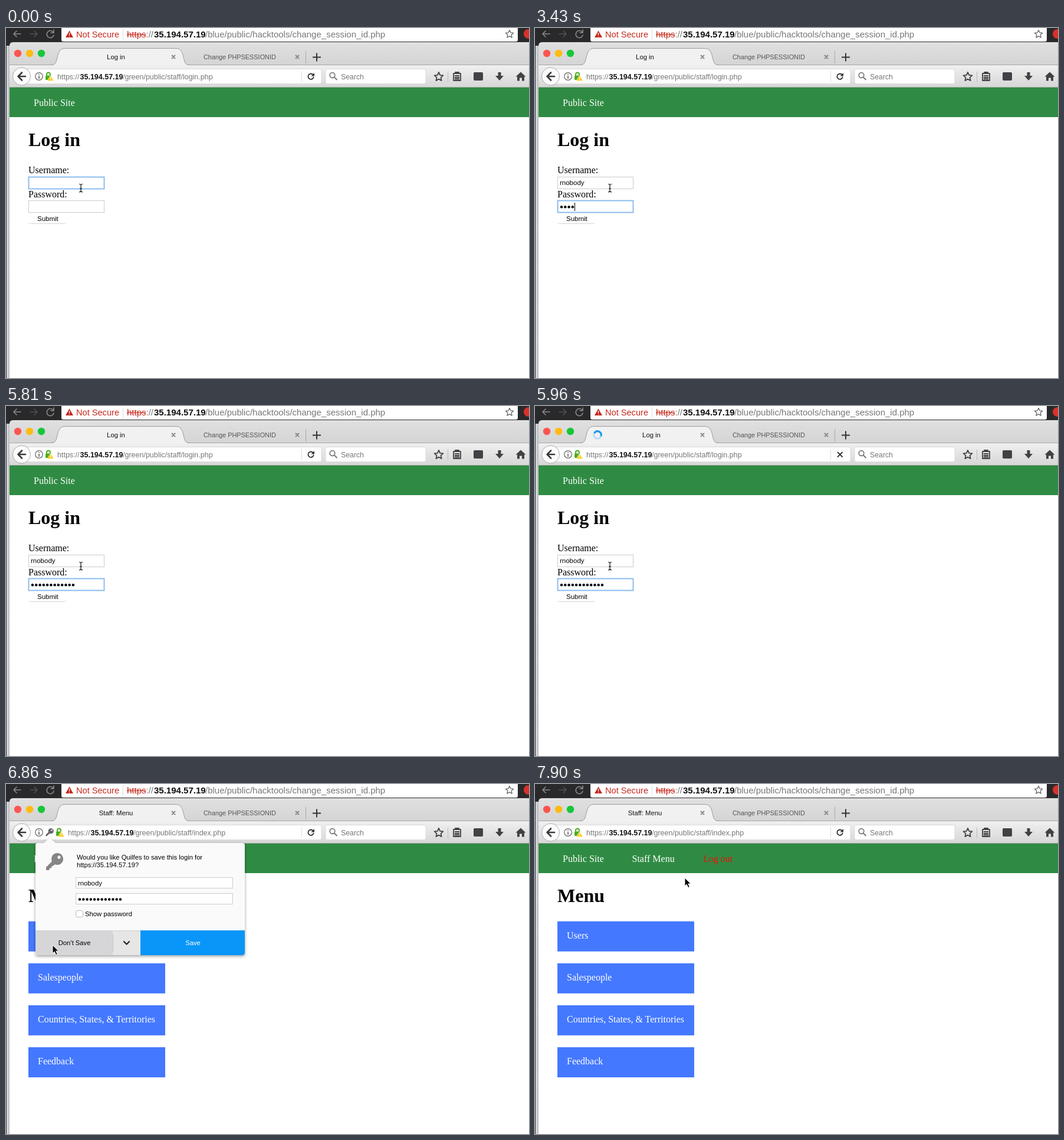
Write an HTML page that moves like this. It is 887x593 px and loops after 8000 ms.

```html
<!DOCTYPE html>
<html lang="en">
<head>
<meta charset="utf-8">
<title>Log in</title>
<style>
html, body { margin: 0; width: 100%; height: 100%; overflow: hidden; background: #fff; }
svg { display: block; width: 887px; height: 593px; }
text { font-family: "Liberation Sans", Arial, sans-serif; font-size: 11.3px; white-space: pre; }
.serif { font-family: "Liberation Serif", "Times New Roman", serif; font-size: 16px; }
.h1 { font-size: 32px; font-weight: bold; }
.b { font-weight: bold; fill: #111; }
.mid { text-anchor: middle; }
.white { fill: #fff; }
.line { fill: none; stroke-linecap: round; stroke-linejoin: round; }
.url { font-size: 12.5px; fill: #777; }
.omni { font-size: 15px; fill: #777; }
.field { fill: #fff; stroke: #ccc; }
.field.focus { stroke: #8dbcf0; stroke-width: 2; }
</style>
</head>
<body>
<svg viewBox="0 0 887 593">
  <defs>
    <linearGradient id="tabbar" x2="0" y2="1"><stop stop-color="#e0e0e0"/><stop offset="1" stop-color="#c9c9c9"/></linearGradient>
    <linearGradient id="toolbar" x2="0" y2="1"><stop stop-color="#f0f0f0"/><stop offset="1" stop-color="#d6d6d6"/></linearGradient>
    <linearGradient id="edge" x2="1" y2="0"><stop stop-color="#e2e2e2"/><stop offset="1" stop-color="#bcbcbc"/></linearGradient>
    <filter id="shade" x="-10%" y="-10%" width="120%" height="120%"><feDropShadow dx="0" dy="2" stdDeviation="2.6" flood-opacity=".38"/></filter>
    <g id="keyShape">
      <path d="M13 12 1 24v5h5l1-3 3-1 1-3 3-1 4-4z"/>
      <path fill-rule="evenodd" d="M20 0a10 10 0 1 0 .1 0zM23 4.500a2.700 2.700 0 1 1-.1 0z"/>
    </g>
  </defs>

  <!-- back window -->
  <rect width="887" height="593" fill="#fff"/>
  <rect width="887" height="30" fill="#29292b"/>
  <rect x="94" y="-4" width="774" height="27" rx="3" fill="#fff"/>
  <g class="line" stroke="#8b8b8b" stroke-width="1.6">
    <path d="M25 10H13m5-5-5 5 5 5"/>
    <path d="M41 10h12m-5-5 5 5-5 5" stroke="#505052"/>
    <path d="M80 7a6 6 0 1 0 1 5M81 3v5h-5"/>
  </g>
  <path d="M107.500 4.500 114 16h-13z" fill="#c5281c"/>
  <path d="M107.500 8v4m0 1.300v1.200" stroke="#fff" stroke-width="1.300"/>
  <text x="119" y="16" class="omni" style="font-size:14.6px;fill:#c5281c">Not Secure</text>
  <path d="M198.500 2v17" stroke="#ddd"/>
  <text y="16" class="omni"><tspan x="205" fill="#c5281c">https</tspan><tspan>://</tspan><tspan x="251" class="b">35.194.57.19</tspan><tspan x="338">/blue/public/hacktools/change_session_id.php</tspan></text>
  <path d="M205 11.500h32" stroke="#c5281c" stroke-width="1.200"/>
  <path class="line star" stroke="#666" stroke-width="1.300"/>
  <circle cx="886" cy="10" r="8" fill="#d8322b"/>

  <!-- front window -->
  <rect y="30" width="6" height="563" fill="url(#edge)"/>
  <rect y="23" width="1" height="570" fill="#26344c"/>
  <path d="M6 101V30q0-6 6-6H887v77z" fill="url(#tabbar)"/>
  <rect x="6" y="63" width="881" height="38" fill="url(#toolbar)"/>
  <path d="M6 62.500H887" stroke="#a5a5a5"/>
  <path d="M76 63.500c9-1 9-6 11-14s4-15 13-15h188c9 0 11 7 13 15s2 13 11 14z" fill="#f1f1f1"/>
  <path d="M76 62.500c9 0 9-5 11-13s4-15 13-15h188c9 0 11 7 13 15s2 13 11 13" fill="none" stroke="#9c9c9c"/>
  <path d="M508.500 39v21" stroke="#a8a8a8"/>
  <path d="M520 49.500h14m-7-7v14" stroke="#333" stroke-width="2"/>
  <circle cx="20" cy="43" r="6.200" fill="#fc5550"/><circle cx="40" cy="43" r="6.200" fill="#fdbb13"/><circle cx="60" cy="43" r="6.200" fill="#16c73a"/>
  <path d="m281 46 6 6m0-6-6 6M491 46l6 6m0-6-6 6" stroke="#858585" stroke-width="1.900"/>
  <text id="title" y="53" class="mid" fill="#111"/>
  <text x="335" y="53" style="font-size:10.9px" fill="#555">Change PHPSESSIONID</text>
  <g id="spinner" class="line" stroke-width="3">
    <circle r="6.300" stroke="#b9ddf6"/><path d="M0-6.300a6.300 6.300 0 0 0-3 11.800" stroke="#1a97ee"/>
  </g>

  <rect x="26" y="69.500" width="509" height="25" rx="3" fill="#fff" stroke="#dadada"/>
  <rect x="542" y="69.500" width="170" height="25" rx="3" fill="#fff" stroke="#dadada"/>
  <circle cx="26.500" cy="82" r="15" fill="#fcfcfc" stroke="#aaa"/>
  <path class="line" d="M33 82H21m6-6.500-6.500 6.500 6.500 6.500" stroke="#3a3a3a" stroke-width="2.600"/>
  <circle cx="56" cy="82" r="6.300" fill="none" stroke="#666" stroke-width="1.200"/>
  <path d="M56 81v5m0-8v1.600" stroke="#555" stroke-width="1.500"/>
  <g id="address">
    <path d="M69 81v-2.500a3 3 0 0 1 6 0V81" fill="none" stroke="#4aae1c" stroke-width="1.900"/>
    <rect x="67" y="80.500" width="9" height="7.500" rx="1" fill="#4aae1c"/>
    <path d="m75.500 80.500 5.500 9H70z" fill="#fcc912" stroke="#fff" stroke-width=".6"/>
    <path d="M75.500 83.500v3m0 .8v1" stroke="#fff" stroke-width="1.200"/>
    <text y="87" class="url"><tspan x="87">https://</tspan><tspan x="125.500" class="b">35.194.57.19</tspan><tspan x="198" id="path"></tspan></text>
  </g>
  <use href="#keyShape" id="smallKey" transform="translate(67 75) scale(.46)" fill="#666"/>
  <path d="M501.500 73v18" stroke="#ddd"/>
  <g id="reload"><path class="line" d="M521 79.500a4.700 4.700 0 1 0 .6 4" stroke="#333" stroke-width="1.900"/><path d="M523 76v5.500h-5.500z" fill="#333"/></g>
  <path id="stop" class="line" d="m513.500 78.500 7.500 7.500m0-7.500-7.500 7.500" stroke="#333" stroke-width="1.900"/>
  <circle cx="553.500" cy="80" r="4.300" fill="none" stroke="#777" stroke-width="1.700"/><path d="m557 83.500 4.500 4.500" stroke="#777" stroke-width="2"/>
  <text x="568" y="87" class="url" style="font-size:12.3px">Search</text>
  <g class="line" stroke="#424246" stroke-width="1.800">
    <path class="star"/>
    <path d="M749.500 74v17" stroke="#bbb" stroke-width="1"/>
    <path d="M759 77h12v12h-12zm3 0v-2h6v2M761.500 81h7m-7 3h7m-7 2.500h7"/>
  </g>
  <g fill="#424246">
    <rect x="793" y="75" width="16" height="14" rx="2"/>
    <path d="M834.500 75h5v6h4.500l-7 8-7-8h4.500zM873 74.500l8.500 8h-2.500v7h-4v-5h-4v5h-4v-7h-2.500z"/>
  </g>

  <rect x="6" y="100" width="881" height="51" fill="#2f8b43"/>
  <path d="M6 100.500H887" stroke="#8fa08f"/>
  <rect x="6" y="151" width="881" height="442" fill="#fff"/>
  <text x="47" y="132" class="serif white">Public Site</text>

  <g id="login">
    <text x="38" y="200" class="serif h1">Log in</text>
    <text x="38" y="246" class="serif">Username:</text>
    <text x="38" y="287" class="serif">Password:</text>
    <rect id="userBox" class="field" x="38.500" y="252.500" width="128" height="20"/>
    <rect id="passBox" class="field" x="38.500" y="292.500" width="128" height="20"/>
    <text id="user" x="42" y="266" style="font-size:11.5px"/>
    <g id="dots"></g>
    <rect id="caret" width="1" height="14"/>
    <path d="M38.500 330q1 1.500 3 1.500h57q2 0 3-1.500" fill="none" stroke="#d4d4d4"/>
    <text x="53" y="327" style="font-size:11.5px">Submit</text>
  </g>

  <g id="menu">
    <text x="164.500" y="132" class="serif white">Staff Menu</text>
    <text x="285" y="132" class="serif" fill="#f10f0a">Log out</text>
    <text x="38" y="200" class="serif h1">Menu</text>
    <g id="items"></g>
  </g>

  <g id="popup">
    <path filter="url(#shade)" d="M54 100h10l10-9 10 9h317q4 0 4 4v182q0 4-4 4H54q-4 0-4-4V104q0-4 4-4z" fill="#fafafa"/>
    <use href="#keyShape" transform="translate(67 117)" fill="#858585"/>
    <text x="120" y="128" style="font-size:11.2px">Would you like Quilfes to save this login for</text>
    <text x="120" y="141" style="font-size:11.2px">https://35.194.57.19?</text>
    <rect class="field" x="118.500" y="158.500" width="266" height="18"/>
    <rect class="field" x="118.500" y="185.500" width="266" height="18"/>
    <text x="122" y="171.500">rnobody</text>
    <g id="savedDots"></g>
    <rect x="118.500" y="214.500" width="12" height="11" rx="2.500" fill="#fff" stroke="#bbb"/>
    <text x="134" y="224">Show password</text>
    <path d="M50 248h178v42H54q-4 0-4-4z" fill="#e6e6e6"/>
    <path id="dont" d="M50 248h131v42H54q-4 0-4-4z"/>
    <path d="M228 248h177v38q0 4-4 4H228z" fill="#0996f8"/>
    <path d="M50 248.500h178" stroke="#d0d0d0"/>
    <path d="M181.500 255v29" stroke="#c4c4c4"/>
    <path class="line" d="m200 267 4.500 4.500L209 267" stroke="#222" stroke-width="2.200"/>
    <text x="116" y="273" class="mid" style="font-size:11.2px">Don’t Save</text>
    <text x="317" y="273" class="mid white" style="font-size:11.2px">Save</text>
  </g>

  <path id="beam" class="line" d="M124.500 264.500q2.500 0 2.500 2 0-2 2.500-2M127 266v10m-2.500 1.800q2.500 0 2.500-2 0 2 2.500 2M125.500 272h3" stroke="#111" stroke-width="1.200"/>
  <path id="arrow" d="M0 0v14l3.200-3 2.600 5.600 2.500-1.100-2.500-5.400h4.500z" stroke="#fff" stroke-width="1"/>
</svg>
<script>
const $ = id => document.getElementById(id);
const show = (id, on) => { $(id).style.display = on ? '' : 'none'; };
const LOOP = 8000, PITCH = 6.27, NAME = 'rnobody';

// time, letters typed, dots typed, caret on
const typing = [
  [0, 0, 0, 0], [450, 2, 0, 1], [600, 3, 0, 1], [750, 5, 0, 1], [890, 6, 0, 1], [1040, 7, 0, 1],
  [1190, 7, 0, 1], [1640, 7, 1, 1], [1790, 7, 2, 1], [1930, 7, 3, 0], [2080, 7, 3, 1],
  [2380, 7, 3, 0], [2530, 7, 4, 1], [2980, 7, 4, 0], [3430, 7, 4, 1], [4030, 7, 4, 0],
  [4330, 7, 5, 1], [4620, 7, 6, 1], [4770, 7, 7, 0], [4920, 7, 7, 1], [5210, 7, 8, 1],
  [5360, 7, 9, 1], [5510, 7, 11, 1], [5660, 7, 12, 1], [5810, 7, 12, 0], [6260, 7, 12, 1]
];
// time, x, y of the arrow pointer
const moves = [
  [6110, 122, 270], [6260, 98, 273], [6410, 58, 275], [6560, 36, 275], [6710, 52, 274],
  [6860, 79, 273], [7160, 106, 262], [7310, 168, 222], [7460, 234, 174], [7750, 248, 164], [7900, 254, 159]
];
const at = (list, t) => list.filter(s => s[0] <= t).pop();

const dotRow = (x, y, n) => Array.from({ length: n },
  (_, i) => `<circle cx="${x + PITCH * i}" cy="${y}" r="2.200"/>`).join('');

const star = (x, y, r) => 'M' + Array.from({ length: 10 }, (_, i) => {
  const a = i * Math.PI / 5, k = i % 2 ? r * 0.48 : r;
  return `${x + k * Math.sin(a)} ${y - k * Math.cos(a)}`;
}).join('L') + 'z';

const stars = document.querySelectorAll('.star');
stars[0].setAttribute('d', star(854, 10.5, 7));
stars[1].setAttribute('d', star(734, 82.8, 7.8));
$('savedDots').innerHTML = dotRow(125, 195.5, 12);
$('items').innerHTML = ['Users', 'Salespeople', 'Countries, States, &amp; Territories', 'Feedback']
  .map((label, i) => `<rect x="38" y="${232.7 + 71.1 * i}" width="232" height="51" fill="#4478ff"/>
    <text x="54" y="${262 + 71.1 * i}" class="serif white">${label}</text>`).join('');

function draw() {
  const t = performance.now() % LOOP;
  const [, letters, dots, caret] = at(typing, t);
  const onPass = t >= 1190, loading = t >= 5960 && t < 6860;
  const menu = t >= 6710, popup = t >= 6110 && t < 7310;

  $('user').textContent = NAME.slice(0, letters);
  $('dots').innerHTML = dotRow(45, 303.3, dots);
  $('userBox').classList.toggle('focus', !onPass);
  $('passBox').classList.toggle('focus', onPass);
  show('login', !menu);
  show('menu', menu);
  show('caret', caret);
  const cx = onPass ? 42 + PITCH * dots : 42 + (letters ? $('user').getComputedTextLength() : 0);
  $('caret').setAttribute('x', Math.floor(cx));
  $('caret').setAttribute('y', onPass ? 296 : 256);

  $('title').textContent = menu ? 'Staff: Menu' : 'Log in';
  $('title').setAttribute('x', loading ? 197.5 : 186.5);
  $('path').textContent = `/green/public/staff/${menu ? 'index' : 'login'}.php`;
  show('spinner', loading);
  $('spinner').setAttribute('transform', `translate(106 49) rotate(${Math.floor((t - 6560) / 150) * 65})`);
  show('stop', loading);
  show('reload', !loading);

  show('popup', popup);
  show('smallKey', popup);
  $('address').setAttribute('transform', `translate(${popup ? 18 : 0} 0)`);
  $('dont').setAttribute('fill', t >= 7160 ? '#c8c8ca' : t >= 6860 ? '#d6d6d8' : '#e6e6e6');

  const move = at(moves, t);
  show('beam', !move);
  show('arrow', move);
  if (move) $('arrow').setAttribute('transform', `translate(${move[1]} ${move[2]})`);
  requestAnimationFrame(draw);
}
draw();
</script>
</body>
</html>
```
